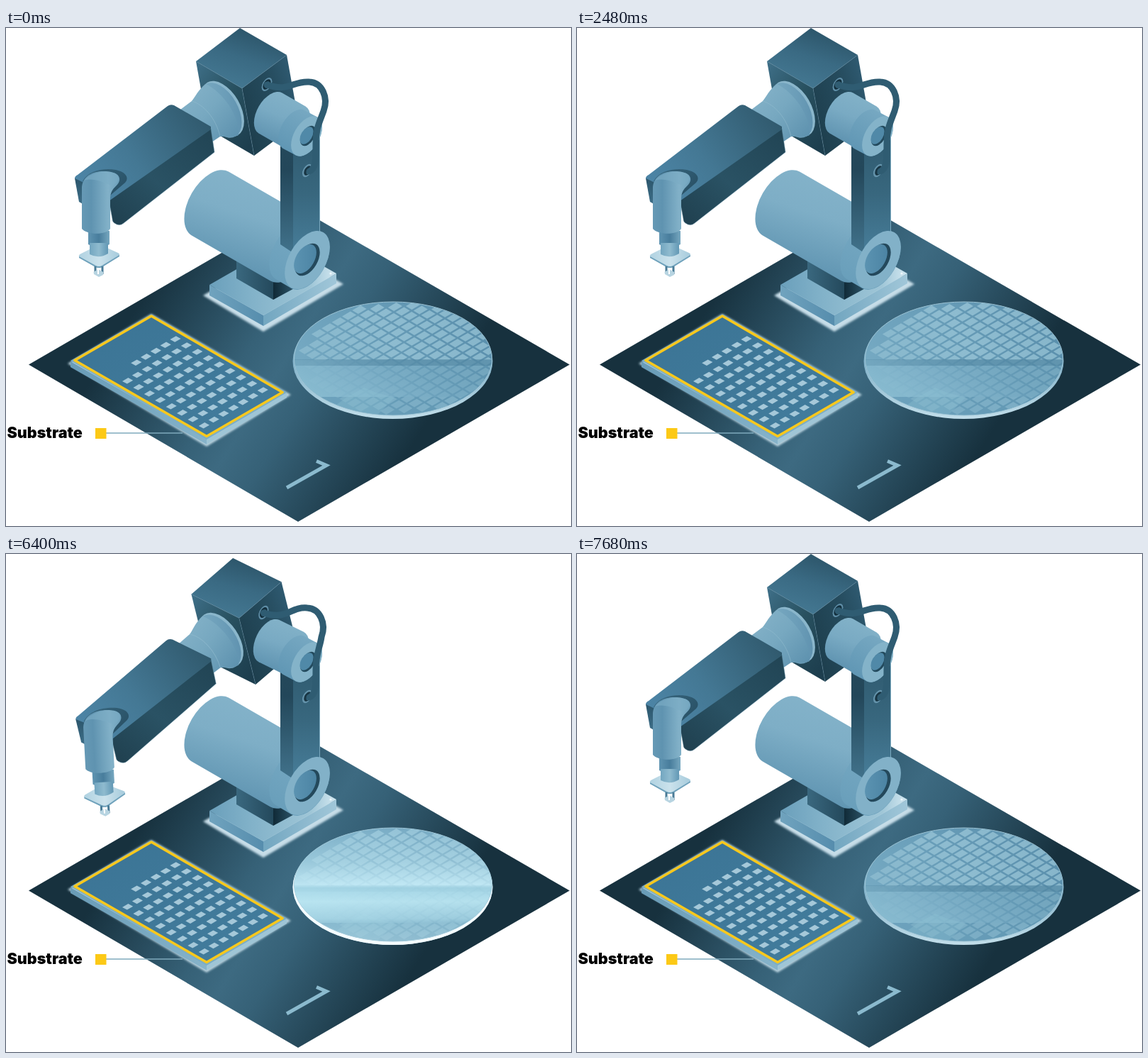
An HTML page for the animation above (10 s loop, 797 by 702 pixels).

```html
<!DOCTYPE html>
<html lang="en">
<head>
<meta charset="utf-8">
<title>Substrate</title>
<style>
html, body { margin: 0; width: 100%; height: 100%; overflow: hidden; background: #fff; }
svg { display: block; width: 797px; height: 702px; }
text { font: 900 21.5px Inter, "Open Sans", sans-serif; }
</style>
</head>
<body>
<svg id="stage" viewBox="0 0 797 702" xmlns="http://www.w3.org/2000/svg"></svg>
<script>
const stage = document.getElementById('stage');
let defs = '';
let count = 0;

// Gradient helper: direction in box units, then colours (evenly spaced or [offset, colour]).
function grad(dir, ...stops) {
  const id = 'g' + count++;
  const [x1, y1, x2, y2] = dir;
  const list = stops.map((s, i) => {
    const [o, c] = Array.isArray(s) ? s : [i / (stops.length - 1), s];
    return `<stop offset="${o}" stop-color="${c}"/>`;
  }).join('');
  defs += `<linearGradient id="${id}" x1="${x1}" y1="${y1}" x2="${x2}" y2="${y2}">${list}</linearGradient>`;
  return `url(#${id})`;
}
const RIGHT = [0, 0, 1, 0], DOWN = [0, 0, 0, 1], DIAG = [0, 0, 1, 1], RISE = [0, 1, 1, 0];

const poly = (pts, fill, more = '') => `<polygon points="${pts}" fill="${fill}" ${more}/>`;
const path = (d, fill, more = '') => `<path d="${d}" fill="${fill}" ${more}/>`;

// A circle seen on an isometric wall; tilt is 30 or -30 degrees.
const disc = (x, y, r, fill, tilt = 30, more = '') =>
  `<ellipse cx="${x}" cy="${y}" rx="${r * 0.577}" ry="${r}" transform="rotate(${tilt} ${x} ${y})" fill="${fill}" ${more}/>`;

// Tube along the isometric axis with round ends.
function tube(x1, y1, x2, y2, r, fill) {
  const dx = r * 0.5, dy = r * 0.866;
  const arc = `A${r * 0.577} ${r} 30 0`;
  return path(`M${x1 + dx} ${y1 - dy}${arc} 0 ${x1 - dx} ${y1 + dy}L${x2 - dx} ${y2 + dy}${arc} 0 ${x2 + dx} ${y2 - dy}Z`, fill);
}

function floor() {
  defs += `<linearGradient id="floor" gradientUnits="userSpaceOnUse" x1="215" y1="345" x2="582" y2="575">
    <stop offset="0" stop-color="#17313e"/><stop offset=".38" stop-color="#366177"/><stop offset=".5" stop-color="#3d6a81"/>
    <stop offset=".62" stop-color="#366177"/><stop offset="1" stop-color="#17313e"/></linearGradient>`;
  const one = path('M396 648L452 616.5L438 610.5', 'none', 'stroke="#8bbace" stroke-width="5"');
  return poly('32,474.5 413,254 795,474.5 412,696', 'url(#floor)') + one;
}

function wafer() {
  const base = grad([0, 0.6, 1, 0.3], '#76aac3', [0.45, '#689db8'], '#5a8fac');
  const cell = grad([0, 0.6, 1, 0.3], '#87b7cc', [0.5, '#8ebcd0'], '#86b5ca');
  const veil = grad([0, 0.65, 1, 0.35], '#8bbed2e0', [0.35, '#7db0c8d0'], [0.7, '#689eb9a0'], '#5f95b080');
  const band = grad(RIGHT, '#4a7f9b40', [0.5, '#4a7f9b80'], '#4a7f9b70');
  const bright = grad(DOWN, '#a8d6e850', [0.3, '#b9e3f090'], [0.5, '#c9effad8'], [0.53, '#b2e2f0c8'], [0.65, '#c4eef8d0'],
    [0.8, '#b5e2efa0'], [0.84, '#a8d6e578'], [1, '#b6dbe888']);
  let tiles = '';
  for (let i = -17; i <= 17; i++) {
    for (let j = -19; j <= 19; j++) {
      const x = 546 + i * 14.4 + j * 10.8, y = 466 - i * 8.4 + j * 6.4;
      if (((x - 546) / 135) ** 2 + ((y - 466) / 77) ** 2 > 1) continue;
      tiles += `M${x.toFixed(1)} ${y.toFixed(1)}l11.8 -6.900l8.400 5l-11.800 6.900z`;
    }
  }
  defs += '<clipPath id="waferClip"><ellipse cx="546" cy="466" rx="139" ry="79.5"/></clipPath>';
  const face = (fill, more = '') => `<ellipse cx="546" cy="466" rx="139.5" ry="80" fill="${fill}" ${more}/>`;
  return `<ellipse cx="545.5" cy="469.5" rx="141" ry="81.5" fill="${grad(DOWN, '#6398b4', '#7fb0c8', '#c2deea')}"/>`
    + '<ellipse id="rim" cx="545.5" cy="469.5" rx="141" ry="81.5" fill="#f4fcff"/>'
    + face(base, 'stroke="#9dc4d5" stroke-width="1"')
    + `<g clip-path="url(#waferClip)">${path(tiles, cell)}`
    + `<rect x="405" y="468" width="282" height="52" fill="${veil}"/>`
    + `<rect x="405" y="467" width="282" height="9" fill="${band}"/>`
    + `<rect x="405" y="520" width="282" height="28" fill="#6299b5" opacity=".4"/>`
    + path('M446 546L480 521L505 507L522 514L548 521L523 546Z', '#8fc2d5', 'opacity=".3"') + '</g>'
    + face(bright, 'id="shine"');
}

function substrate() {
  let chips = '';
  for (let a = 0; a < 9; a++) {
    for (let b = 0; b < (a ? 7 : 5); b++) {
      const x = 239 + a * 15.4 - b * 13.8, y = 438.5 + a * 9 + b * 8.3;
      chips += `M${x - 7.6} ${y + 0.6}l8.400 -4.900l6.800 3.700l-8.400 4.900z`;
    }
  }
  return poly('87,473 205,403 402,517 283,590', '#b9d3df', 'filter="url(#soft)"')
    + poly('91,470 283,579 283,587 91,478', grad(RIGHT, '#699cb7', '#86b3ca'))
    + poly('283,579 396,514 396,521 283,587', '#9fc5d6')
    + poly('91,469 205,403.5 396,514 283,580', '#7badc5')
    + poly('97,468.5 205,406 390,513.5 283,575.5', grad(DIAG, '#3b7495', '#437d9d'), 'stroke="#f8c81c" stroke-width="3.6" stroke-linejoin="round"')
    + path(chips, '#a5c8d9');
}

function body() {
  const ring = '#82b1c8';
  const dark = '#24495c';
  return poly('278,377 363,428 476,361 392,312', '#c6dde8', 'filter="url(#soft)"')
    + poly('287,362 363,405 363,420 287,377', grad(RIGHT, '#70a3be', '#568dad'))
    + poly('363,405 466,346 466,360 363,420', grad(RIGHT, '#72a6c0', '#a1c7d9'))
    + poly('287,362 390,303 466,346 363,405', grad(RIGHT, '#6a9fbb', '#82b2c9', [0.8, '#9fc6d7'], '#d3e8f1'))
    + poly('325,322 377,350 377,383 325,353', grad(RIGHT, '#3a687f', dark))
    + poly('377,350 414,340 414,363 377,383', grad(RIGHT, '#102a37', '#335f75'))
    + tube(288, 247.5, 399, 311.5, 52, grad([0.65, 0.1, 0.35, 0.9], '#83b2c9', [0.4, '#7eaec6'], '#5f94b1'))
    + tube(403, 315, 425, 328, 45, grad([0.8, 0, 0.2, 1], '#7aabc4', '#689eba'))
    + poly('387,150 405,155 405,317 387,305', grad(DOWN, '#25495b', [0.3, '#23475a'], '#41728b'))
    + poly('405,150 443,150 443,310 405,317', grad(DOWN, '#2f5a6f', [0.5, '#38677e'], '#477d99'))
    + path('M442.5 152V296', 'none', 'stroke="#7ba9bf" stroke-width="1"')
    + disc(425, 327, 45, ring)
    + disc(425, 326.5, 25, dark)
    + disc(422, 325.5, 22.5, grad(RISE, '#5e96b4', '#4981a1'))
    + '<circle cx="458" cy="346" r="1.6" fill="#eef7fb"/>'
    + disc(425, 201, 10, '#6493ab') + disc(425.5, 201, 7.5, '#183543') + disc(427, 202, 4.5, '#3f718a');
}

function head() {
  return poly('268,47 333,85 350,180 285,142', grad([0, 0, 0.8, 1], '#3f7089', '#28505f', '#1d3e4e'))
    + poly('333,85 396,38 413,133 350,180', grad([0, 0.6, 1, 0], '#1e3f4e', '#254b5d', '#33617a'))
    + poly('330,0 396,38 333,85 268,47', grad([0.2, 0.9, 0.65, 0], '#447892', '#3a6a83', '#2b5367'))
    + path('M268 47L333 85L396 38M333 85L350 180', 'none', 'stroke="#537f97" stroke-width=".7" opacity=".7"')
    + disc(305.5, 114, 43, '#8ab6cb', -30)
    + disc(302.5, 116, 42.5, grad(DIAG, '#7eaec5', [0.6, '#6b9db8'], '#5a8dab'), -30)
    + path('M282 79C270 88 268 96 262 103L246 115L290 161L302 153C314 153 322 154 328 151C330 126 308 92 282 79Z',
      grad([0, 0, 1, 0.9], '#87b4ca', [0.5, '#77a8c0'], '#5d91ae'))
    + path('M262 103C279 108 296 127 302 153', 'none', 'stroke="#94bdcf" stroke-width="1" opacity=".55"')
    + tube(373, 120, 406, 139, 33, grad([0.7, 0, 0.3, 1], '#84b3c9', [0.45, '#79aac3'], '#598eac'))
    + disc(368, 79.5, 10.5, '#5f8ea7') + disc(368, 79.5, 8, '#132f3d') + disc(368.5, 80, 5, '#3b6c84');
}

function elbow() {
  return tube(406, 143, 424, 152.5, 31, grad([0.8, 0, 0.2, 1], '#79aac3', '#5e95b3'))
    + disc(424, 152.5, 31, '#84b3c9')
    + disc(426, 152, 15.5, '#234a5d') + disc(424, 151.5, 13.5, '#5089a8');
}

function forearm() {
  const metal = grad(RIGHT, '#6699b5', [0.25, '#5f93b0'], [0.7, '#82b1c8'], '#6c9fba');
  return poly('97,212 112,212 110,249 103,245', grad(DOWN, '#2c566c', '#3d6e88'))
    + path('M145 242L289 142L294 175L166 275Q160 280 153 275Q150 273 150 269Z', grad(RISE, '#1f3f4e', [0.45, '#2a5264'], '#214454'), 'stroke="#5f8aa0" stroke-width=".5"')
    + path('M97 212Q97 209 101 207L228 110Q232 107 237 109L289 139V143L145 244L112 219Z', grad([0, 0.7, 1, 0.2], '#4c84a5', [0.4, '#447894'], '#30596d'))
    + path('M108 216C116 201 137 197 155 200C170 203 174 212 168 218L147 236L146 250L130 230Z', grad([0, 0, 1, 0.7], '#3a6a83', '#274e62'))
    // vertical shaft
    + path('M116 286H146V305Q131 313 116 305Z', grad(RIGHT, '#5f94b1', '#487d9c', '#76a7bf'))
    + path('M103 322Q102 320 106 318L130 306Q133 305 136 307L158 317Q162 319 158 322L135 335Q131 337 127 335L105 324Z', grad(RIGHT, '#b0d2e1', '#cbe2ec', '#a6cbdc'))
    + path('M103 322L127 335Q131 337 135 335L160 320V322L135 337.5Q131 339 127 337.5L103 324Z', '#6ea1bb')
    + path('M118 303H144V318Q131 326 118 319Z', grad(RIGHT, '#73a6c0', '#8fbbcf', '#6298b5'))
    + path('M107 224C109 207 124 201 141 202C157 203 161 209 160 215C158 224 148 224 147 240V283C142 292 114 292 107 283Z', metal)
    + path('M110 215C118 203 141 200 154 205C163 210 158 218 150 223C136 216 121 211 110 215Z', '#7badc5', 'opacity=".65"')
    + path('M126 336V346M136 336V347', 'none', 'stroke="#497b96" stroke-width="3"')
    + path('M123.500 344L130 340L137 344V348L131 351L124 347Z', '#b7d4e1')
    + path('M130 338V347', 'none', 'stroke="#fff" stroke-width="2"');
}

function label() {
  return path('M141 571H249', 'none', 'stroke="#7faabd" stroke-width="1.5"')
    + '<rect x="126" y="564" width="15.5" height="15" fill="#fcc916"/>'
    + '<text x="1.5" y="578">Substrate</text>';
}

const art = floor() + wafer() + substrate() + body()
  + `<g id="head">${head()}</g>` + elbow()
  + `<g id="arm">${forearm()}</g>`
  + '<path id="hose" fill="none" stroke="#2f5c72" stroke-width="9" stroke-linecap="round"/>'
  + label();
defs += '<filter id="soft" x="-10%" y="-10%" width="120%" height="120%"><feGaussianBlur stdDeviation="1.6"/></filter>';
stage.innerHTML = `<defs>${defs}</defs>${art}`;

const part = id => document.getElementById(id);
const [headEl, armEl, hose, shine, rim] = ['head', 'arm', 'hose', 'shine', 'rim'].map(part);

const LOOP = 10000, STEP = 80;
const ARM = [[2560, 0], [3040, 1.24], [3280, 1], [6720, 1], [7040, 1.24], [7400, -0.25], [7680, 0]];
const GLOW = [[1760, 0], [2120, 1], [2480, 0], [6399, 0], [6400, 1], [7120, 0]];

// Smooth value between keyed times.
function keyed(keys, t) {
  if (t <= keys[0][0]) return keys[0][1];
  for (let i = 1; i < keys.length; i++) {
    const [t0, a] = keys[i - 1], [t1, b] = keys[i];
    if (t <= t1) return a + (b - a) * (1 - Math.cos(Math.PI * (t - t0) / (t1 - t0))) / 2;
  }
  return keys[keys.length - 1][1];
}

function draw(time) {
  const t = Math.floor((time % LOOP) / STEP) * STEP;
  const p = keyed(ARM, t), g = keyed(GLOW, t);
  const turn = -0.067 * p;
  headEl.setAttribute('transform', `rotate(${turn * 180 / Math.PI} 411 150)`);
  armEl.setAttribute('transform', `matrix(${1 + 0.0149 * p} ${turn} ${0.0535 * p} 1 ${-11.5 * p} ${27.5 * p})`);

  const c = Math.cos(turn), s = Math.sin(turn);
  const x = 411 - 43 * c + 70 * s, y = 150 - 43 * s - 70 * c;
  const k = -3 * p;
  hose.setAttribute('d', `M${x} ${y}C${x + 32} ${y + 11} ${404 + k} 74 ${428 + k} 76C${446 + k} 77 ${455 + k} 98 ${448 + k} 117`
    + 'C443 131 437 141 437 163C437 188 437 198 428 202');
  shine.setAttribute('opacity', g);
  rim.setAttribute('opacity', Math.sqrt(g));
}

function tick(now) {
  draw(now);
  requestAnimationFrame(tick);
}
draw(0);
requestAnimationFrame(tick);
</script>
</body>
</html>
```
